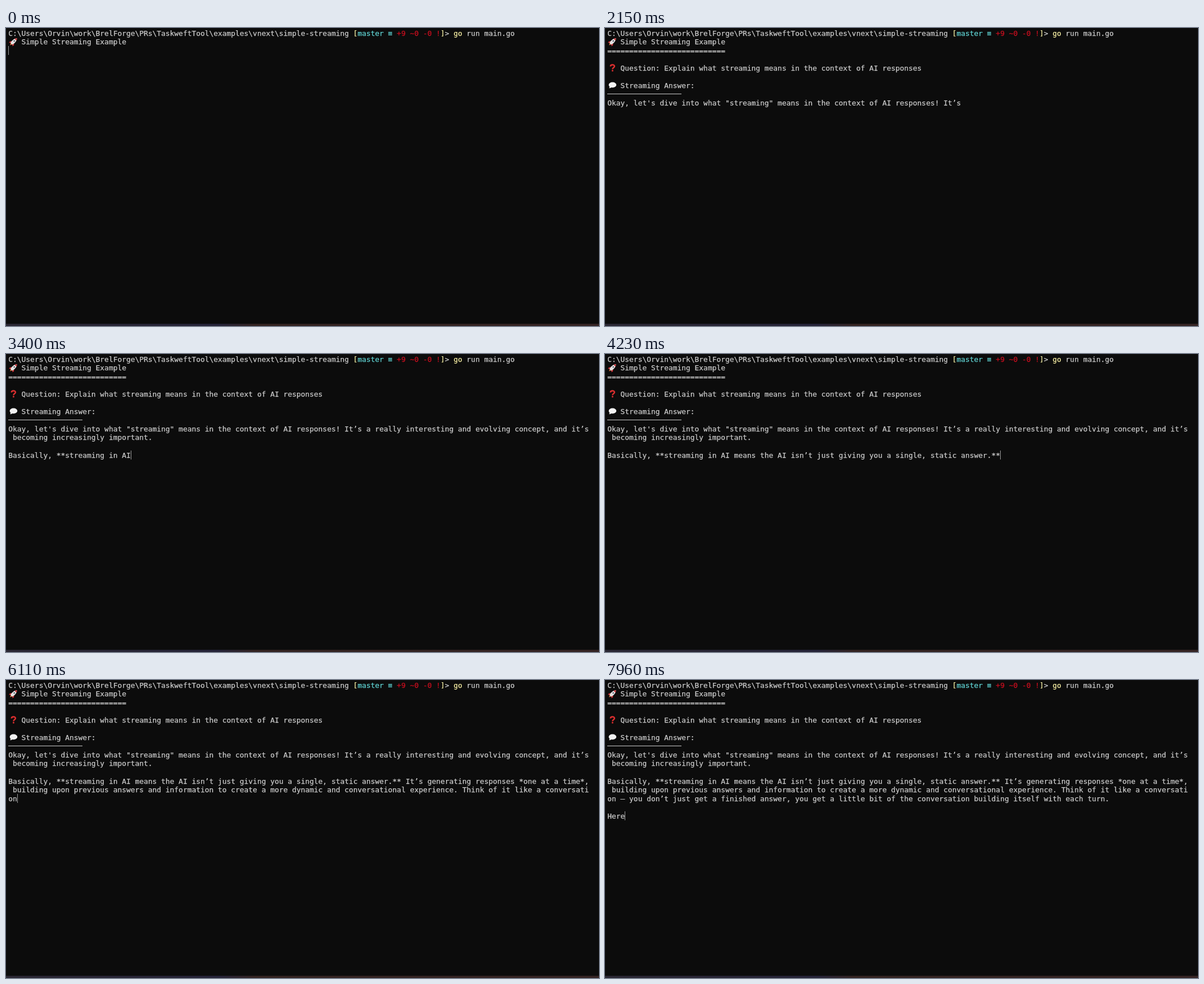
Write an HTML page with a canvas that moves like this. It is 1055 px wide and 531 px high and loops after 8000 ms.

```html
<!DOCTYPE html>
<html lang="en">
<head>
<meta charset="utf-8">
<title>Terminal</title>
<style>
html, body { margin: 0; width: 100%; height: 100%; overflow: hidden; background: #0c0c0c; }
canvas { display: block; width: 1055px; height: 531px; }
</style>
</head>
<body>
<canvas id="stage" width="1055" height="531"></canvas>
<script>
const ctx = document.getElementById('stage').getContext('2d');
const LOOP = 8000, COLS = 133, LEFT = 4.28, CELL = 7.765, TOP = 1.1, LINE = 15.55, BASE = 12.42;
const GREY = '#cccccc', YELLOW = '#f9f1a5', CYAN = '#61d6d6', RED = '#c50f1f';

const prompt = [
  ['C:\\Users\\Orvin\\work\\BrelForge\\PRs\\TaskweftTool\\examples\\vnext\\simple-streaming ', GREY],
  ['[', YELLOW], ['master ≡ ', CYAN], ['+9 ~0 -0 !', RED], [']', YELLOW],
  ['> ', GREY], ['go', YELLOW], [' run main.go', GREY]
];

// Bursts of output: first step, last step, text split into evenly timed steps.
const bursts = [
  [1000, 1800, 'Okay,| let|\'s| dive| into| what| "|streaming|"| means| in| the| context'],
  [1870, 2640, ' of| AI| responses!| It|’s| a| really| interesting| and| evolving| concept,| and it'],
  [2700, 3470, '’s| becoming| increasingly| important|.|\n\n|Basically|,| **streaming| in| AI| means the'],
  [3540, 4300, ' AI| isn|’t| just| giving| you| a| single,| static| answer|.**| It’'],
  [4370, 5150, 's| generating| responses| *one| at a| time*,| building| upon| previous| answers| and| information'],
  [5220, 5900, ' to| create| a more| dynamic| and| conversational| experience|.| Think| of it'],
  [6050, 6790, ' like a| conversation| –| you| don|’|t| just| get| a| finished| answer'],
  [6860, 7610, ',| you| get| a| little| bit| of| the| conversation| building| itself| with'],
  [7680, 7960, ' each| turn|.|\n\n|Here']
];

const steps = bursts.flatMap(([from, to, text]) => {
  const parts = text.split('|');
  return parts.map((part, i) => ({
    at: Math.floor((from + (to - from) * i / (parts.length - 1)) / 10) * 10,
    part
  }));
});

const cellX = col => LEFT + col * CELL;
const rowY = row => TOP + row * LINE;

// Writes on the character grid and returns where the pen ends.
function write(text, row, col = 0, color = GREY) {
  ctx.fillStyle = ctx.strokeStyle = color;
  ctx.lineWidth = 0.25;
  for (const ch of text) {
    if (ch === '\n') { row++; col = 0; continue; }
    if (col === COLS) { row++; col = 0; }
    if (ch !== ' ') {
      ctx.fillText(ch, cellX(col), rowY(row) + BASE);
      ctx.strokeText(ch, cellX(col), rowY(row) + BASE);
    }
    col++;
  }
  return { row, col };
}

function fillPath(d, color) {
  ctx.fillStyle = color;
  ctx.fill(new Path2D(d));
}

function disc(x, y, rx, ry, color) {
  ctx.fillStyle = color;
  ctx.beginPath();
  ctx.ellipse(x, y, rx, ry, 0, 0, Math.PI * 2);
  ctx.fill();
}

function rocket() {
  ctx.save();
  ctx.translate(13.4, 24.4);
  ctx.rotate(Math.PI / 4);
  fillPath('M-2.4 1 L-5 4 L-4.4 7.2 L-2 5 Z M2.4 1 L5 4 L4.4 7.2 L2 5 Z', '#d13438');
  fillPath('M-1.6 5 L0 9 L1.6 5 Z', '#f7894a');
  fillPath('M0 -8.6 C3.6 -5 3.6 1 2.2 5.4 L-2.2 5.4 C-3.6 1 -3.6 -5 0 -8.6 Z', '#e4e2e2');
  fillPath('M0 -8.6 C1.2 -7.4 1.9 -6.2 2.2 -5 L-2.2 -5 C-1.9 -6.2 -1.2 -7.4 0 -8.6 Z', '#d13438');
  disc(0, -1.8, 1.3, 1.3, '#4a5564');
  ctx.restore();
}

function questionMark() {
  ctx.strokeStyle = '#dc2f2f';
  ctx.lineWidth = 2.5;
  ctx.stroke(new Path2D('M9.8 68.4 C9.8 64.8 16.9 64.6 16.9 68.2 C16.9 70.6 13.4 70.6 13.4 73.6'));
  disc(13.4, 76, 1.5, 1.5, '#dc2f2f');
}

function balloon() {
  disc(13.4, 101.4, 6.8, 4.8, '#f2f2f2');
  fillPath('M8.2 103 L7.6 107.6 L13 105.6 Z', '#f2f2f2');
}

function bottomEdge() {
  const glow = ctx.createLinearGradient(0, 0, 1055, 0);
  glow.addColorStop(0, '#2a2733');
  glow.addColorStop(0.36, '#252338');
  glow.addColorStop(0.42, '#332321');
  glow.addColorStop(1, '#352424');
  ctx.fillStyle = glow;
  ctx.fillRect(0, 527, 1055, 4);
}

function drawHeader() {
  let col = 0;
  for (const [text, color] of prompt) col = write(text, 0, col, color).col;
  rocket();
  write('Simple Streaming Example', 1, 3);
}

function drawQuestion() {
  write('='.repeat(27), 2);
  questionMark();
  write('Question: Explain what streaming means in the context of AI responses', 4, 3);
  balloon();
  write('Streaming Answer:', 6, 3);
  ctx.fillStyle = GREY;
  ctx.fillRect(4, 117, 132, 1);
}

const cursorShown = t => !(t >= 540 && t < 1000) && !(t >= 2150 && t < 2220);

function draw(t) {
  ctx.fillStyle = '#0c0c0c';
  ctx.fillRect(0, 0, 1055, 531);
  ctx.font = '12.9px "DejaVu Sans Mono", monospace';
  ctx.lineJoin = 'round';
  bottomEdge();
  drawHeader();
  let pen = { row: 2, col: 0 };
  if (t >= 70) {
    drawQuestion();
    const answer = steps.filter(s => s.at <= t).map(s => s.part).join('');
    pen = write(answer, 8);
  }
  if (cursorShown(t)) {
    ctx.fillStyle = '#9c9c9c';
    ctx.fillRect(Math.round(cellX(Math.min(pen.col, COLS - 1))), Math.round(rowY(pen.row)), 1, 16);
  }
}

const start = performance.now();
function tick() {
  draw((performance.now() - start) % LOOP);
  requestAnimationFrame(tick);
}
tick();
</script>
</body>
</html>
```
